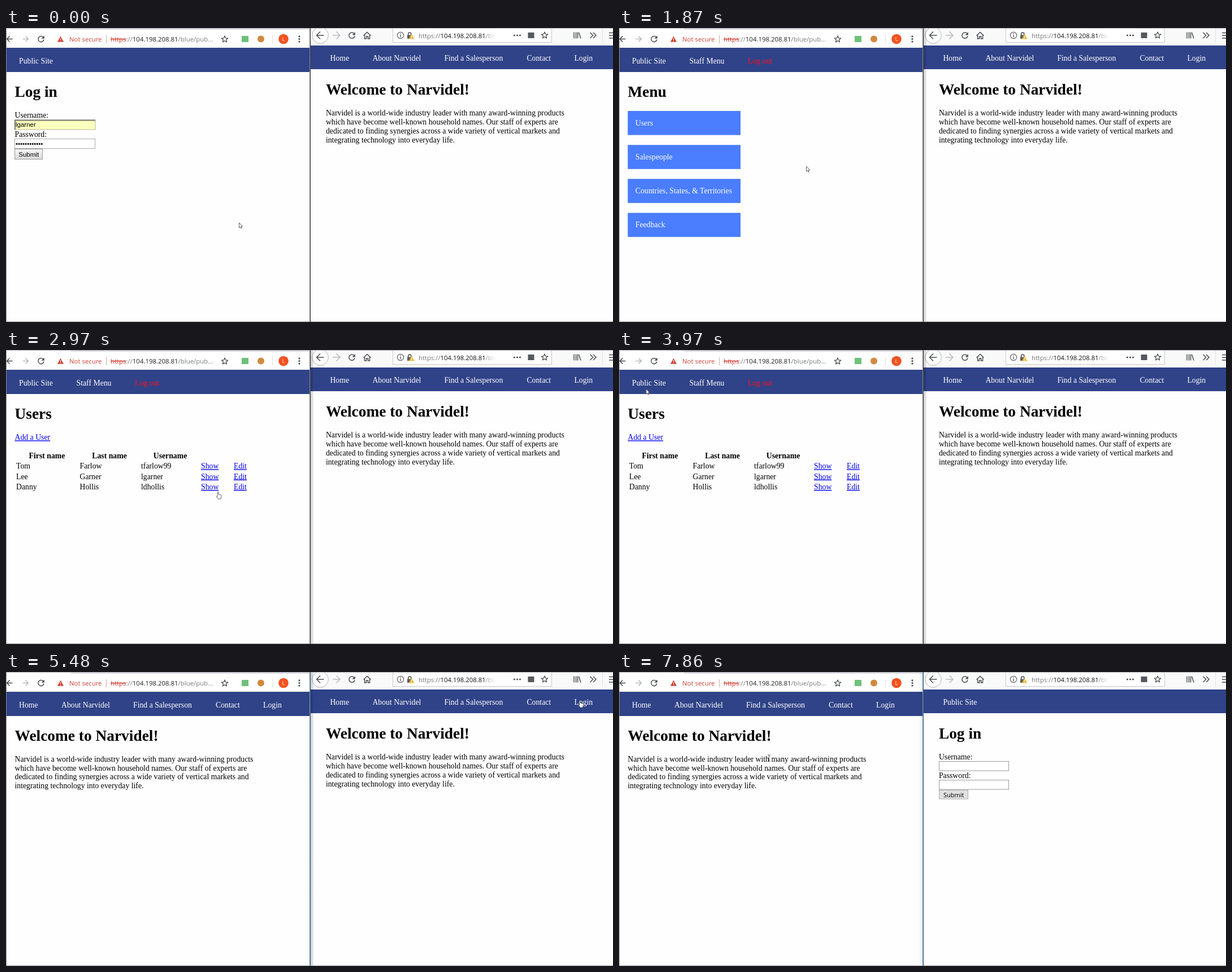
An HTML page for the animation above (8 s loop, 1074x521 px).

```html
<!DOCTYPE html>
<html lang="en">
<head>
<meta charset="utf-8">
<title>Two browsers, one login</title>
<style>
html, body { margin: 0; width: 100%; height: 100%; overflow: hidden; background: #fefefe; }
svg { display: block; }
text { font: 13.75px "Liberation Serif", "Times New Roman", serif; white-space: pre; }
.h1 { font-size: 27.4px; font-weight: bold; }
.b { font-weight: bold; text-anchor: middle; }
.w { fill: #fff; }
.a { fill: #00e; text-decoration: underline; }
.form { font: 11.5px "Liberation Sans", Arial, sans-serif; }
.ui { font: 11.4px "Open Sans", "Noto Sans", sans-serif; }
.line { fill: none; stroke: #4a4d51; stroke-width: 1.5; }
.off { stroke: #b8babd; }
</style>
</head>
<body>
<svg id="stage" width="1074" height="521" viewBox="0 0 1074 521"></svg>
<script>
const LOOP = 8000;
const stage = document.getElementById('stage');

const text = (x, y, s, cls = '', more = '') => `<text x="${x}" y="${y}" class="${cls}" ${more}>${s}</text>`;
const rect = (x, y, w, h, fill, more = '') => `<rect x="${x}" y="${y}" width="${w}" height="${h}" fill="${fill}" ${more}/>`;
const disc = (x, y, r, fill, more = '') => `<circle cx="${x}" cy="${y}" r="${r}" fill="${fill}" ${more}/>`;
const line = (d, cls = '', more = '') => `<path class="line ${cls}" d="${d}" ${more}/>`;
const group = (id, body, x = 0, y = 0) => `<g id="${id}" transform="translate(${x} ${y})">${body}</g>`;
const nav = (...items) => items.map(([x, s]) => text(x, 62.5, s, 'w')).join('');
const title = s => text(15.5, 122, s, 'h1');

// Toolbar icons, centred on x, y
const arrow = (x, y, r, dir, cls) => line(`M${x - r * dir} ${y}H${x + r * dir}m${-r * dir} ${-r}l${r * dir} ${r}l${-r * dir} ${r}`, cls);
const reload = (x, y, id) => `<g id="${id}">` +
  line(`M${x + 3.8} ${y - 3.4}A5.1 5.1 0 1 0 ${x + 5} ${y + 1}`) +
  `<path d="M${x + 5.8} ${y - 6}v5.2h-5.2z" fill="#4a4d51"/></g>`;
const star = (x, y) => {
  const points = Array.from({ length: 10 }, (_, i) => {
    const r = i % 2 ? 2.7 : 6, a = i * Math.PI / 5;
    return `${x + r * Math.sin(a)},${y - r * Math.cos(a)}`;
  });
  return `<polygon points="${points.join(' ')}" fill="none" stroke="#4a4d51" stroke-width="1.3" stroke-linejoin="round"/>`;
};
const dots = (x, y, dx, dy) => [-1, 0, 1].map(i => disc(x + i * dx, y + i * dy, 1.6, '#4a4d51')).join('');
const warning = (x, y, r, fill) => `<path d="M${x} ${y - r}l${r} ${r * 1.85}h${-2 * r}z" fill="${fill}"/>` +
  rect(x - .6, y - r * .35, 1.2, r * .6, '#fff') + rect(x - .6, y + r * .45, 1.2, 1.2, '#fff');

const leftBar = rect(0, 0, 537, 36, '#fff') + rect(115, 0, 422, 3, '#dcdee2') +
  arrow(6.5, 19.5, 5, -1) + arrow(34.5, 19.5, 5, 1, 'off') + reload(62, 19.5, 'leftReload') +
  warning(96.5, 20, 5.5, '#d23f31') +
  text(112, 24, 'Not secure', 'ui', 'fill="#d23f31"') + rect(177, 13, 1, 14, '#d0a8a4') +
  text(185, 24, '<tspan fill="#d23f31" text-decoration="line-through">https</tspan>://<tspan fill="#222">104.198.208.81</tspan>/blue/pub...', 'ui', 'fill="#77797c"') +
  star(387, 20) + rect(417, 14, 12, 11, '#6fc07a') + disc(451, 19.5, 6, '#cf8a3c') +
  rect(471, 13, 1, 14, '#ddd') + disc(491, 19.5, 8.8, '#f4511e') +
  text(491, 23, 'L', 'ui', 'fill="#fff" text-anchor="middle" style="font-size:9.5px"') +
  dots(519, 19.5, 0, 4.6);

const rightBar = rect(539, 0, 535, 31, '#f9f9fa') + rect(684.5, -2, 281, 27.5, '#fff', 'stroke="#c8c8ca"') +
  disc(556, 13, 14.3, '#fff', 'stroke="#b4b4b6"') + arrow(556, 13, 6.5, -1) + arrow(584.5, 13, 6.5, 1, 'off') +
  reload(612, 13.2, 'rightReload') +
  line('M632.5 13.5l6.5-6 6.5 6M634.5 12.5v6.5h3v-4h3v4h3v-6.5', '', 'stroke-width="2"') +
  disc(698, 13, 5.6, 'none', 'stroke="#606266" stroke-width="1.2"') + rect(697.3, 12, 1.5, 4.3, '#606266') + rect(697.3, 9.5, 1.5, 1.5, '#606266') +
  line('M711.7 13v-2.5a2.6 2.6 0 0 1 5.2 0V13') + rect(710, 12.5, 8, 6.5, '#5a5c60') + warning(717.5, 15.4, 4.8, '#f0b429') +
  text(730, 17.5, 'https://<tspan fill="#111">104.198.208.81</tspan>/blu', 'ui', 'fill="#77797c" style="font-size:11.3px"') +
  rect(846, 3, 30, 20, 'url(#fade)') + dots(904.5, 13, 5, 0) +
  rect(923.5, 8, 11, 10, '#55585c') + star(953, 13) +
  line('M1005 7.5v11M1008.5 7.5v11M1011.5 7.5v11M1013.5 8l3.5 10.5') +
  line('M1033.5 8l5 5-5 5M1039 8l5 5-5 5', '', 'stroke-width="1.8"') +
  rect(1055, 0, 1, 26, '#e2e2e4') + line('M1067 8.5h8M1067 13.2h8M1067 18h8');

const home = leading => nav([23, 'Home'], [98, 'About Narvidel'], [225, 'Find a Salesperson'], [371, 'Contact'], [455, 'Login']) +
  title('Welcome to Narvidel!') + [
    'Narvidel is a world-wide industry leader with many award-winning products',
    'which have become well-known household names. Our staff of experts are',
    'dedicated to finding synergies across a wide variety of vertical markets and',
    'integrating technology into everyday life.'
  ].map((s, i) => text(15.5, 159.2 + i * leading, s)).join('');

const loginPage = nav([23, 'Public Site']) + title('Log in') + text(15.5, 159.2, 'Username:') + text(15.5, 192.9, 'Password:');

const leftLogin = loginPage +
  rect(16, 163, 142, 17, '#faffbd', 'stroke="#b5b5a0"') + line('M16 180V163.5H158', '', 'style="stroke:#77776c;stroke-width:2"') +
  text(17, 175.2, 'lgarner', 'form') +
  rect(15.5, 196.5, 142, 17, '#fff', 'stroke="#a9a9a9"') + text(17, 209, '•'.repeat(12), 'form') +
  rect(15.5, 214.5, 49, 18, 'url(#button)', 'stroke="#999"') + text(22.3, 228, 'Submit', 'form');

const rightLogin = loginPage +
  [163, 196].map(y => rect(16.1, y, 123, 16.5, '#fff', 'stroke="#9a9a9a"')).join('') +
  rect(16.1, 214, 51, 15.5, '#e1e1e1', 'stroke="#adadad"') + text(23.5, 226, 'Submit', 'ui', 'style="font-size:11px"');

const staff = nav([23, 'Public Site'], [124.5, 'Staff Menu']) + text(228, 62.5, 'Log out', '', 'fill="#ff0f22"');

const menu = staff + title('Menu') + ['Users', 'Salespeople', 'Countries, States, &amp; Territories', 'Feedback']
  .map((s, i) => rect(15.5, 147 + i * 60.2, 199.5, 42.7, '#4a7dff', `id="item${i}"`) + text(29, 172.7 + i * 60.2, s, 'w')).join('');

const users = staff + title('Users') + text(15.5, 159.2, 'Add a User', 'a') +
  text(72.5, 192, 'First name', 'b') + text(183, 192, 'Last name', 'b') + text(290.5, 192, 'Username', 'b') +
  [['Tom', 'Farlow', 'tfarlow99'], ['Lee', 'Garner', 'lgarner'], ['Danny', 'Hollis', 'ldhollis']].map((row, i) => {
    const y = 210.2 + i * 18.4;
    return row.map((s, j) => text([18, 130.5, 239][j], y, s)).join('') + text(345, y, 'Show', 'a') + text(403, y, 'Edit', 'a');
  }).join('');

const gradient = (id, dir, from, to) => `<linearGradient id="${id}" ${dir}><stop ${from}/><stop ${to}/></linearGradient>`;

stage.innerHTML = '<defs>' +
  gradient('fade', '', 'stop-color="#fff" stop-opacity="0"', 'offset=".7" stop-color="#fff"') +
  gradient('button', 'x2="0" y2="1"', 'stop-color="#f6f6f6"', 'offset="1" stop-color="#dcdcdc"') +
  gradient('shadeR', '', 'stop-opacity=".2"', 'offset="1" stop-opacity=".06"') +
  gradient('shadeL', '', 'stop-opacity="0"', 'offset="1" stop-opacity=".07"') +
  '</defs>' + rect(0, 0, 1074, 521, '#fefefe') + leftBar + rightBar +
  rect(0, 35, 538, 43, '#304388') + rect(539, 31, 535, 42, '#304388') +
  group('leftLogin', leftLogin) + group('menu', menu) + group('users', users) + group('leftHome', home(15.5)) +
  group('rightHome', home(16.1), 550.4, -4.5) + group('rightLogin', rightLogin, 550.4, -4.5) +
  rect(539, 0, 5, 521, 'url(#shadeR)', 'id="leftShade"') + rect(530, 0, 7, 521, 'url(#shadeL)', 'id="rightShade"') +
  rect(0, 0, 1074, 1, '#a9abb0') + rect(0, 520, 1074, 1, '#9a9a9a') + rect(0, 0, 1, 521, '#8d8d8d') +
  rect(537, 0, 1, 521, '#8d8d8d') + rect(538, 0, 1, 521, '', 'id="edge"') +
  `<g id="cursor" fill="#fff" stroke="#4c4c50" stroke-width=".9" stroke-linejoin="round">
    <path id="pointer" d="M.5 .5V9.7L2.6 7.8 4 10.8 5.4 10.2 4.1 7.2H6.6z"/>
    <path id="hand" d="M3 .5q1.2 0 1.2 1.2V5l4 1q.9.3.8 1.4L8 13H3.7L.5 8.7q.7-1.1 1.6-.1V1.7Q2.1.5 3 .5z"/>
    <path id="beam" d="M-2.5 -5.5H2.5M0 -5.5V5.5M-2.5 5.5H2.5" fill="none"/>
  </g>`;

// Cursor moves: first step, last step, number of steps, x, y, shape on arrival
const moves = [
  [380, 1080, 5, 38, 222],
  [1350, 1870, 4, 331, 244.5],
  [2160, 2550, 4, 60, 166, 'hand'],
  [2820, 2970, 2, 372, 251, 'hand'],
  [3120, 3820, 6, 48, 76],
  [3970, 4120, 2, 47, 61, 'hand'],
  [4420, 4420, 1, 296.5, 95],
  [4540, 5360, 7, 1003, 53],
  [5480, 5480, 1, 1012.5, 50, 'hand'],
  [5620, 6130, 4, 300, 180],
  [6280, 6470, 2, 520, 210],
  [6590, 6590, 1, 615, 223.5, 'beam'],
  [6750, 6890, 2, 652, 232],
  [7030, 7580, 5, 345, 238],
  [7710, 7860, 2, 265.5, 152.5, 'beam']
];

function cursorAt(t) {
  let x = 412, y = 344.5, shape = 'pointer';
  for (const [start, end, steps, toX, toY, arrival = 'pointer'] of moves) {
    if (t < start) break;
    const step = steps === 1 ? 1 : Math.min(steps, 1 + Math.floor((t - start) / (end - start) * (steps - 1) + 1e-6));
    x += (toX - x) * step / steps;
    y += (toY - y) * step / steps;
    shape = step === steps ? arrival : 'pointer';
  }
  return { x, y, shape };
}

const el = id => document.getElementById(id);
const show = (id, on) => { el(id).style.display = on ? '' : 'none'; };

function draw(now) {
  const t = now % LOOP;
  const between = (a, b) => t >= a && t < b;
  const clicked = t >= 5480, raised = t >= 5620, loaded = t >= 5760;
  show('leftLogin', t < 1350);
  show('menu', between(1350, 2820));
  show('users', between(2820, 4420));
  show('leftHome', t >= 4420);
  show('rightHome', !loaded);
  show('rightLogin', loaded);
  show('leftShade', t >= 1350 && !raised);
  show('rightShade', raised);
  el('edge').setAttribute('fill', clicked ? '#1f6aa5' : '#3c3c44');
  el('rightReload').setAttribute('opacity', between(5760, 6750) ? .4 : 1);
  el('item0').setAttribute('fill', between(2420, 2820) ? '#3f6be0' : '#4a7dff');

  const { x, y, shape } = cursorAt(t);
  el('cursor').setAttribute('transform', `translate(${x} ${y})`);
  for (const id of ['pointer', 'hand', 'beam']) show(id, id === shape);
  requestAnimationFrame(() => draw(performance.now()));
}
draw(0);
</script>
</body>
</html>
```
